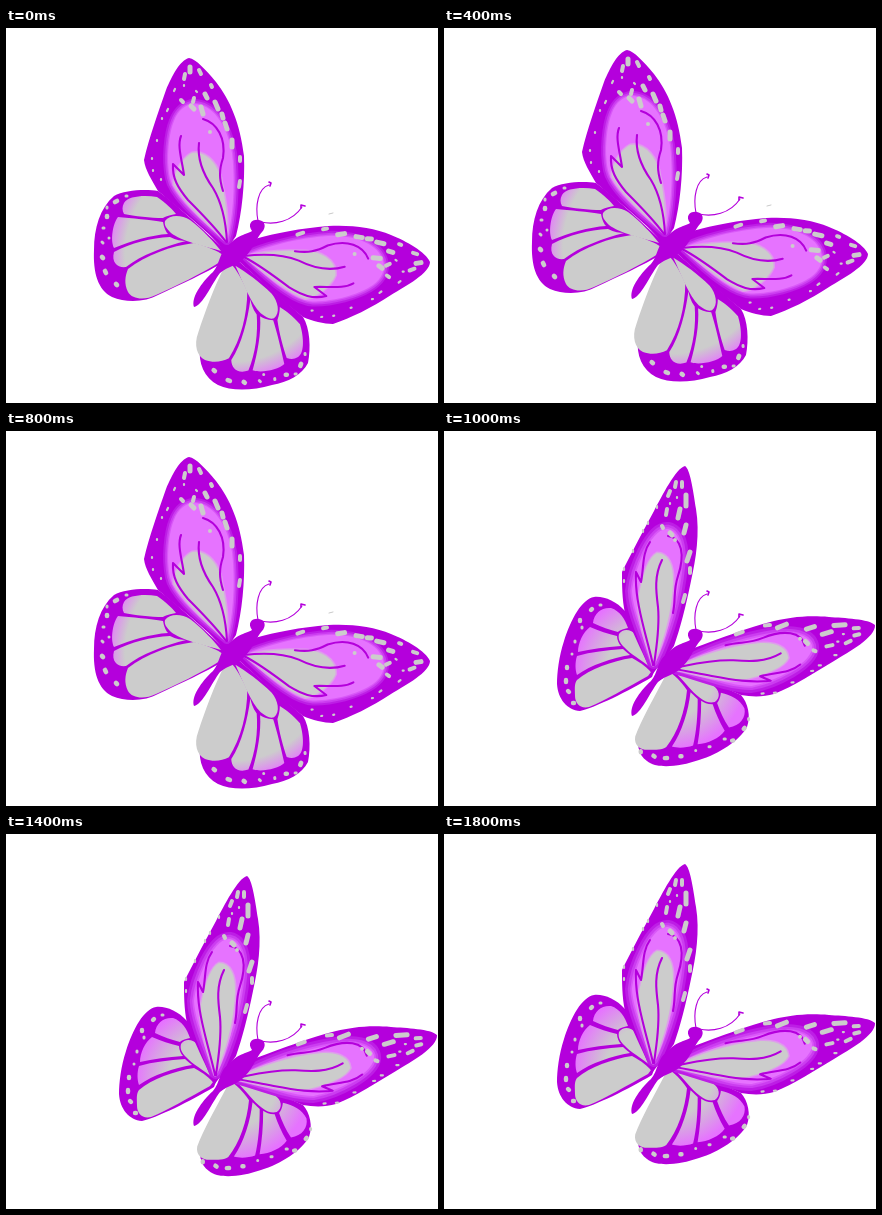
Recreate the animation shown at these times as an HTML page. Size 432 px wide and 375 px high, loop 2 s.

```html
<!DOCTYPE html>
<html lang="en">
<head>
<meta charset="utf-8">
<title>Butterfly</title>
<style>
html, body { margin: 0; width: 100%; height: 100%; overflow: hidden; background: #fff; }
svg { display: block; width: 432px; height: 375px; }
path { stroke-linecap: round; stroke-linejoin: round; }
</style>
</head>
<body>
<svg id="stage" viewBox="0 0 432 375"></svg>
<script>
const PURPLE = '#b400dc', PINK = '#e673ff', GREY = '#ccc';
const stage = document.getElementById('stage');

function add(parent, tag, attrs) {
  const el = document.createElementNS('http://www.w3.org/2000/svg', tag);
  for (const k in attrs) el.setAttribute(k, attrs[k]);
  return parent.appendChild(el);
}

// Affine map that carries three points onto three others
function affine([a, b, c], [p, q, r]) {
  const ux = b[0] - a[0], uy = b[1] - a[1], vx = c[0] - a[0], vy = c[1] - a[1];
  const det = ux * vy - uy * vx;
  return (x, y) => {
    const s = ((x - a[0]) * vy - (y - a[1]) * vx) / det;
    const t = ((y - a[1]) * ux - (x - a[0]) * uy) / det;
    return [0, 1].map(i => p[i] + s * (q[i] - p[i]) + t * (r[i] - p[i]));
  };
}

const warp = (d, map) => d.replace(/(-?[\d.]+) (-?[\d.]+)/g,
  (_, x, y) => map(+x, +y).map(n => n.toFixed(1)).join(' '));

// Details are drawn on the left wings; "from" and "to" place them on the right ones
const poses = [
  {
    shift: 0,
    hind: {
      outlines: [
        'M152 163C140 161 118 162 108 168C94 180 88 200 88 222C87 245 92 262 106 269C120 275 140 274 152 267C175 256 200 245 216 235L219 222C200 205 175 180 152 163Z',
        'M297 289C304 300 305 320 302 335C296 347 282 354 266 357C245 363 225 363 212 357C198 350 192 335 194 318C198 295 208 265 221 236L229 230C250 248 275 270 297 289Z'
      ],
      from: [[217, 226], [122, 264], [119, 174]],
      to: [[226, 236], [199, 332], [293, 328]],
      reach: 118, stop: .83,
      cells: [
        'M118 175C122 168 138 167 151 169C160 175 166 181 170 186C163 187 159 189 157 190C145 190 128 188 118 186C116 182 116 179 118 175Z',
        'M112 189C125 190 145 192 157 194C158 200 160 204 162 206C145 207 125 213 108 220C104 212 107 195 112 189Z',
        'M108 224C125 215 145 210 164 209C170 212 176 213 180 213C160 218 135 227 120 239C112 240 105 235 108 224Z',
        'M159 193C164 186 176 187 184 192C197 202 208 214 215 223C198 218 175 213 165 205C160 200 158 197 159 193Z'
      ],
      lobe: 'M122 241C140 227 165 218 188 215C200 218 212 223 217 227L214 234C195 246 170 258 150 267C138 273 126 271 122 264C118 256 119 248 122 241Z',
      spots: {
        3: 'M96 214L97 215M97 200L98 200M103 210L103 210M120 168L121 168M101 179L101 180',
        4.6: 'M109 174L111 173M101 188L101 189M96 229L97 230M99 243L100 245M110 256L111 257'
      }
    },
    fore: {
      outlines: [
        'M183 30C190 31 200 42 210 54C224 72 234 95 238 128C239 155 236 185 230 208L219 224C205 205 178 185 152 163C146 152 139 142 138 132C143 110 152 85 160 62C166 48 174 32 183 30Z',
        'M424 234C420 224 400 213 385 207C365 198 335 196 312 199C285 202 260 207 243 213L229 230C250 248 275 272 297 289C306 293 318 296 327 296C345 290 365 280 385 267C400 258 424 245 424 234Z'
      ],
      from: [[220, 214], [183, 30], [138, 132]],
      to: [[238, 229], [424, 234], [327, 296]],
      rim: 10,
      glow: 'M188 76C206 76 221 96 226 125C230 160 226 195 221 212C200 196 168 170 164 150C160 130 163 105 168 93C172 82 180 76 188 76Z',
      patch: 'M186 125C201 122 214 138 216 156C221 178 222 200 220 213C206 199 180 178 168 157C166 148 176 130 186 125Z',
      veins: 'M175 108C171 118 176 132 178 147L167 136C166 150 172 160 182 172C196 186 210 200 220 214' +
        'M193 115C191 132 197 146 207 160C216 175 220 195 221 214M197 91C211 95 220 110 217 130C213 142 213 150 217 163',
      spots: {
        2.2: 'M169 61L168 63M162 81L161 83M156 90L156 91M151 112L151 113M146 130L146 131M147 142L147 143M155 151L155 152M190 63L191 64M178 57L178 58',
        4: 'M179 46L178 51M193 42L195 46M175 72L177 74M205 57L206 59M234 129L234 133M234 153L233 159M188 70L187 74M204 104L204 104',
        5: 'M184 39L184 44M199 66L201 70M209 74L212 81M219 95L221 101M226 112L226 119M185 78L188 81M195 79L197 86M216 86L217 90'
      }
    }
  },
  {
    shift: 4,
    hind: {
      outlines: [
        'M181 170C172 160 160 155 150 156C138 158 127 178 120 200C115 215 113 232 113 243C114 258 123 269 136 270C150 267 185 250 208 236L211 228C205 215 195 195 181 170Z',
        'M297 254C304 262 307 275 303 286C295 300 275 313 255 319C235 326 212 328 203 320C194 314 192 302 196 290C204 272 215 250 225 234L229 228C255 236 280 246 297 254Z'
      ],
      from: [[207, 231], [133, 258], [174, 192]],
      to: [[226, 231], [201, 307], [272, 262]],
      reach: 78, stop: .58,
      cells: [
        'M149 182C150 172 158 166 167 167C176 170 181 178 184 187C178 188 175 190 174 191C166 189 157 186 149 182Z',
        'M146 186C155 190 164 193 173 195C173 199 175 203 177 205C162 206 147 208 134 211C134 202 139 191 146 186Z',
        'M133 215C147 211 163 209 179 208C182 211 185 213 186 214C168 217 147 224 133 234C131 229 131 221 133 215Z',
        'M175 193C179 187 187 188 192 194C200 204 206 217 208 228C198 219 186 213 180 206C175 201 174 197 175 193Z'
      ],
      lobe: 'M133 239C146 228 168 220 188 217C198 222 204 228 207 231L204 235C184 246 160 260 145 266C136 268 131 262 131 255C131 248 130 243 133 239Z',
      spots: {
        3: 'M131 200L131 201M138 186L138 187M128 213L128 213M156 164L157 164',
        4.4: 'M147 169L148 168M136 179L136 180M123 226L123 227M122 239L122 241M124 250L125 251M129 262L130 262'
      }
    },
    fore: {
      outlines: [
        'M241 25C246 28 249 48 252 68C256 92 252 118 247 140C242 165 236 188 230 205L208 234C204 222 192 200 181 172C178 158 178 143 178 131C186 115 200 88 210 70C218 55 232 27 241 25Z',
        'M431 184C425 178 400 177 385 176C360 174 345 177 330 180C305 186 275 198 250 207L229 226C250 235 275 245 297 254C308 256 320 256 330 253C350 245 370 232 390 220C405 211 432 196 431 184Z'
      ],
      from: [[209, 224], [240, 25], [178, 131]],
      to: [[230, 228], [431, 184], [328, 254]],
      rim: 14,
      glow: 'M224 88C235 90 239 106 237 125C234 155 225 190 210 221C203 200 189 172 188 150C190 130 207 86 224 88Z',
      patch: 'M213 112C224 112 230 124 229 142C228 170 220 200 209 224C203 205 194 180 194 160C197 142 202 118 213 112Z',
      veins: 'M206 101C198 112 200 126 197 141L192 131C191 150 195 168 200 188C204 204 207 214 209 224' +
        'M218 119C210 135 212 150 214 166C216 188 212 208 210 224M224 95C238 97 241 114 234 135C229 150 232 158 229 172',
      spots: {
        2.2: 'M180 139L180 141M180 127L180 129M189 109L189 111M199 89L199 91M204 81L204 83M213 65L213 67M226 62L226 63M233 56L233 57',
        4: 'M232 41L231 46M238 41L238 46M226 50L224 55M246 127L246 132M241 154L239 161M218 85L219 87M231 99L231 99M223 68L222 74',
        5: 'M242 54L242 65M236 68L234 77M242 84L240 92M246 111L243 120M226 92L228 94'
      }
    }
  }
];

const fill = (g, d, color) => add(g, 'path', { d, fill: color });
const line = (g, d, color, width) => add(g, 'path', { d, fill: 'none', stroke: color, 'stroke-width': width });

function drawSpots(g, spots, map) {
  for (const width in spots) line(g, warp(spots[width], map), GREY, width);
}

function drawHind(g, wing, map, id) {
  const [cx, cy] = map(...wing.from[0]);
  const grad = add(g, 'radialGradient', { id, gradientUnits: 'userSpaceOnUse', cx, cy, r: wing.reach });
  add(grad, 'stop', { offset: wing.stop, 'stop-color': GREY });
  add(grad, 'stop', { offset: 1, 'stop-color': PINK });
  wing.cells.forEach(d => fill(g, warp(d, map), `url(#${id})`));
  fill(g, warp(wing.lobe, map), GREY);
  drawSpots(g, wing.spots, map);
}

function drawFore(g, wing, map) {
  const glow = warp(wing.glow, map), patch = warp(wing.patch, map);
  line(g, glow, '#bd1ee5', wing.rim);
  line(g, glow, '#cb3df0', wing.rim * .6);
  line(g, glow, '#d958f8', wing.rim * .25);
  fill(g, glow, PINK);
  line(g, patch, '#dd9eea', 3);
  fill(g, patch, GREY);
  line(g, warp(wing.veins, map), PURPLE, 2.1);
  drawSpots(g, wing.spots, map);
}

function drawPair(g, wing, draw, id) {
  [wing.from, wing.to].forEach((to, side) => {
    fill(g, wing.outlines[side], PURPLE);
    draw(g, wing, affine(wing.from, to), id + side);
  });
}

function drawBody(g) {
  fill(g, 'M188 279C185 270 195 255 207 244C214 236 214 222 222 218C232 206 240 207 246 203C241 196 246 191 253 192C260 193 260 200 256 204C251 209 247 221 240 228C232 238 222 238 214 245C205 257 197 277 188 279Z', PURPLE);
  line(g, 'M252 193C249 178 252 160 263 157M255 194C268 197 286 194 296 179', PURPLE, 1.1);
  line(g, 'M263 154L265 155L264 158M295 180L295 177L299 178', PURPLE, 1.6);
}

const groups = poses.map((pose, i) => {
  const g = add(stage, 'g', {});
  const wings = add(g, 'g', { transform: `translate(0 ${pose.shift})` });
  drawPair(wings, pose.hind, drawHind, `tint${i}`);
  drawPair(wings, pose.fore, drawFore, '');
  drawBody(g);
  return g;
});
line(groups[0], 'M323 186L327 185', '#bbb', .8);

// The wings flip between open and half shut on every step while the body bobs
const STEP = 200;
const bob = [0, -4, -8, -10, -4, 6, 8, 13, 12, 1];
const start = performance.now();

function frame(now) {
  const step = Math.floor(Math.max(0, now - start) / STEP) % bob.length;
  groups.forEach((g, i) => {
    g.setAttribute('display', i === step % 2 ? 'inline' : 'none');
    g.setAttribute('transform', `translate(0 ${bob[step]})`);
  });
  requestAnimationFrame(frame);
}
frame(start);
</script>
</body>
</html>
```
